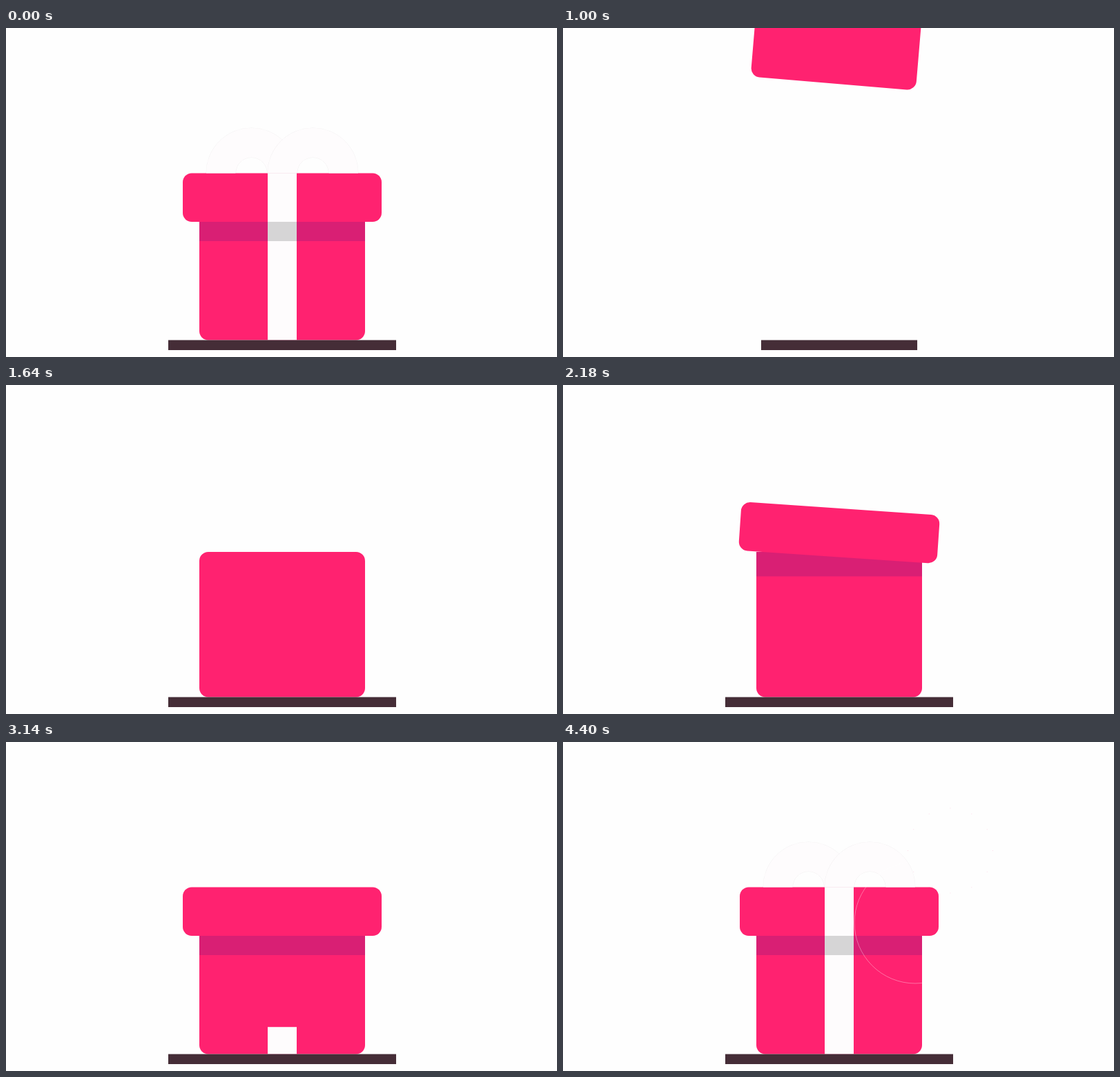
An HTML page with a canvas for the animation above (4440 ms loop, 798x477 px).

```html
<!DOCTYPE html>
<html lang="en">
<head>
<meta charset="utf-8">
<title>Gift box</title>
<style>
  html, body { margin: 0; width: 100%; height: 100%; overflow: hidden; background: #fefefe; }
  canvas { display: block; }
</style>
</head>
<body>
<canvas id="stage" width="798" height="477"></canvas>
<script>
const canvas = document.getElementById('stage');
const ctx = canvas.getContext('2d');
const LOOP = 4440, STEP = 40, MID = 400;
const PINK = '#ff2270', SHADE = '#d91f74', DARK = '#452d37', RIBBON = '#fefcfd', GREY = '#d6d5d6';
const BOX_LANDS = 1177, LID_LANDS = 2125;

// Spans that run at a steady step; the picture holds between them.
const SPANS = [[0, 2040], [2180, 3180], [3320, 3320], [3460, 3500], [3640, 3640], [3780, 3780], [3920, 4400]];

// Ribbon length over time: straight part first, then the left loop.
const GROWTH = [[3040, 0], [3180, 55], [3320, 87], [3460, 205], [3500, 280], [3640, 331], [3780, 352], [3920, 381]];
const STRAIGHT = 242, LOOP_LENGTH = 139;

const clamp = v => Math.max(0, Math.min(1, v));
const phase = (t, start, length) => clamp((t - start) / length);
const easeOut = p => 1 - (1 - p) * (1 - p);

function snap(t) {
  const [start, end] = SPANS.filter(s => s[0] <= t).pop();
  return Math.min(end, start + Math.floor((t - start) / STEP) * STEP);
}

function along(keys, t) {
  if (t <= keys[0][0]) return keys[0][1];
  for (let i = 1; i < keys.length; i++) {
    const [t0, v0] = keys[i - 1], [t1, v1] = keys[i];
    if (t < t1) return v0 + (v1 - v0) * (t - t0) / (t1 - t0);
  }
  return keys[keys.length - 1][1];
}

// Tilted fall, one hop that tips the other way, then settling flat.
function drop(t, lands) {
  const dt = t - lands, tilt = 4.8, hop = 280;
  if (dt < 0) return { lift: -2.1 * dt, tilt };
  if (dt < hop) {
    const p = dt / hop;
    return { lift: 200 * p * (1 - p), tilt: tilt * Math.cos(Math.PI * p) };
  }
  return { lift: 0, tilt: -tilt * (1 - easeOut(phase(dt, hop, 190))) };
}

function rect(x, y, w, h, color) {
  ctx.fillStyle = color;
  ctx.fillRect(x, y, w, h);
}

function block(cy, w, h, pose) {
  ctx.save();
  ctx.translate(MID, cy - pose.lift);
  ctx.rotate(pose.tilt * Math.PI / 180);
  ctx.fillStyle = PINK;
  ctx.beginPath();
  ctx.roundRect(-w / 2, -h / 2, w, h, 13);
  ctx.fill();
  ctx.restore();
}

// One half of the bow; side is -1 for left, 1 for right.
function bowLoop(side, p) {
  if (p <= 0) return;
  const outer = 65.5, inner = 23, skew = 14;
  const sweep = d => -clamp((180 * p + d) / 180) * Math.PI;
  ctx.save();
  ctx.translate(MID + side * 44.5, 210.5);
  ctx.scale(-side, 1);
  ctx.beginPath();
  ctx.arc(0, 0, outer, 0, p < 1 ? sweep(-skew) : -Math.PI, true);
  ctx.arc(0, 0, inner, p < 1 ? sweep(skew) : -Math.PI, 0);
  ctx.closePath();
  ctx.fillStyle = RIBBON;
  ctx.strokeStyle = 'rgba(90,60,75,.12)';
  ctx.lineWidth = .6;
  ctx.stroke();
  ctx.fill();
  ctx.restore();
}

function ribbon(t) {
  const length = along(GROWTH, t);
  if (length <= 0) return;
  const rise = Math.min(length, STRAIGHT);
  bowLoop(-1, clamp((length - STRAIGHT) / LOOP_LENGTH));
  bowLoop(1, easeOut(phase(t, 3900, 320)));
  const top = 452.5 - rise;
  rect(379, top, 42, rise, RIBBON);
  if (top < 309) rect(379, Math.max(top, 281), 42, 309 - Math.max(top, 281), GREY);
}

function sparkle(t) {
  const p = easeOut(phase(t, 4080, 320));
  if (p <= 0) return;
  ctx.strokeStyle = 'rgba(255,255,255,.35)';
  ctx.lineWidth = 1;
  ctx.beginPath();
  ctx.arc(510, 262, 88 * p, 0, 7);
  ctx.stroke();
  for (let i = 0; i < 12; i++) {
    const a = i * Math.PI / 6;
    rect(560.5 + 61.5 * p * Math.cos(a), 157 + 61.5 * p * Math.sin(a), 1, 1, 'rgba(255,34,112,.15)');
  }
}

function draw(t) {
  ctx.clearRect(0, 0, canvas.width, canvas.height);
  canvas.style.opacity = t < 400 ? 1 - t / 400 : 1;
  if (t >= 400 && t < 727) return;
  // The finished gift fades out at the start of the loop.
  const done = t < 400;
  const at = done ? LOOP : t;

  block(347.25, 240, 210.5, drop(at, BOX_LANDS));
  const lid = drop(at, LID_LANDS);
  const shadeTop = Math.max(242, 270 - lid.lift), shadeEnd = 309 - lid.lift;
  if (shadeEnd > shadeTop) rect(280, shadeTop, 240, shadeEnd - shadeTop, SHADE);
  block(245.75, 288, 70.5, lid);
  ribbon(at);
  if (!done) sparkle(at);

  const width = 330 * easeOut(phase(at, 727, 622));
  rect(MID - width / 2, 452.5, width, 14.5, DARK);
}

const began = performance.now();
function tick() {
  draw(snap((performance.now() - began) % LOOP));
  requestAnimationFrame(tick);
}
tick();
</script>
</body>
</html>
```
